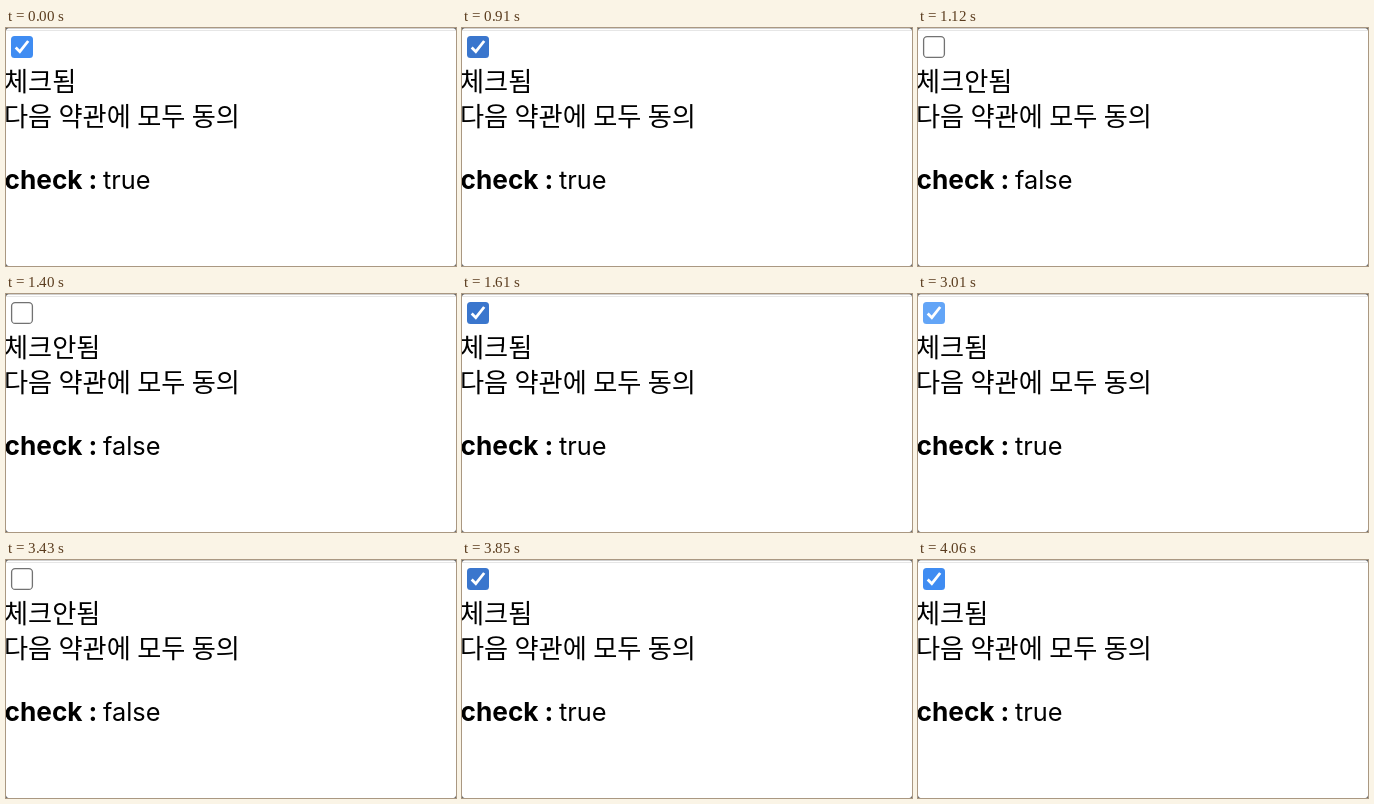
Recreate the animation shown at these times as an HTML page. Size 450 by 238 pixels, loop 4550 ms.

```html
<!DOCTYPE html>
<html lang="ko">
<head>
<meta charset="utf-8">
<title>Checkbox</title>
<style>
  html, body { margin: 0; width: 100%; height: 100%; overflow: hidden; background: #fff; }
  svg { display: block; width: 100vw; height: 100vh; }
  text { fill: #000; font: 350 26.2px "Noto Sans CJK KR", "Noto Sans CJK", sans-serif; word-spacing: -1px; }
  .latin { font: 25.3px Inter, sans-serif; }
  .bold { font-size: 26.2px; font-weight: 700; }
  .on, .off, .fill, .outline { animation: 4550ms step-end infinite; }
  .on { animation-name: on; }
  .off { animation-name: off; }
  .fill { fill: #3f8cf2; animation-name: fill; }
  .outline { fill: #fff; stroke: #727272; stroke-width: 1.3; animation-name: outline; }

  /* Released at 1120, 1610, 3080 and 3850 ms */
  @keyframes on {
    0%, 35.385%, 84.615%, 100% { visibility: visible; }
    24.615%, 67.692% { visibility: hidden; }
  }
  @keyframes off {
    0%, 35.385%, 84.615%, 100% { visibility: hidden; }
    24.615%, 67.692% { visibility: visible; }
  }
  /* Hovered, pressed, then left by the pointer */
  @keyframes fill {
    0%, 87.692%, 100% { fill: #3f8cf2; }
    20%, 35.385%, 84.615% { fill: #3a76cd; }
    23.077%, 66.154% { fill: #63a5f7; }
  }
  @keyframes outline {
    0%, 24.615%, 67.692%, 100% { stroke: #727272; }
    32.308%, 81.538% { stroke: #9a9a9a; }
  }
</style>
</head>
<body>
<svg viewBox="0 0 450 238">
  <rect width="450" height="238" fill="#fff"/>
  <rect width="450" height="1" fill="#d0d0d0"/>
  <rect y="2" width="450" height="1" fill="#e6e6e6"/>
  <path d="M0 2.5V0H2.5Q.5 .5 0 2.5M450 2.5V0H447.5Q449.5 .5 450 2.5M0 235.5V238H2.5Q.5 237.5 0 235.5M450 235.5V238H447.5Q449.5 237.5 450 235.5" fill="#666"/>

  <text x="-2" y="97.6">다음 약관에 모두 동의</text>
  <text class="latin bold" x="-1.4" y="161">check</text>
  <text class="latin bold" x="82.5" y="161">:</text>

  <g class="on">
    <rect class="fill" x="5" y="8" width="22" height="22" rx="3.5"/>
    <path d="M9.7 19.6L13.8 23.7L22.2 13" fill="none" stroke="#fff" stroke-width="2.8"/>
    <text x="-2" y="62.7">체크됨</text>
    <text class="latin" x="97" y="161">true</text>
  </g>
  <g class="off">
    <rect class="outline" x="5.6" y="8.6" width="20.8" height="20.8" rx="3.5"/>
    <text x="-2" y="62.7">체크안됨</text>
    <text class="latin" x="97" y="161">false</text>
  </g>
</svg>
</body>
</html>
```
